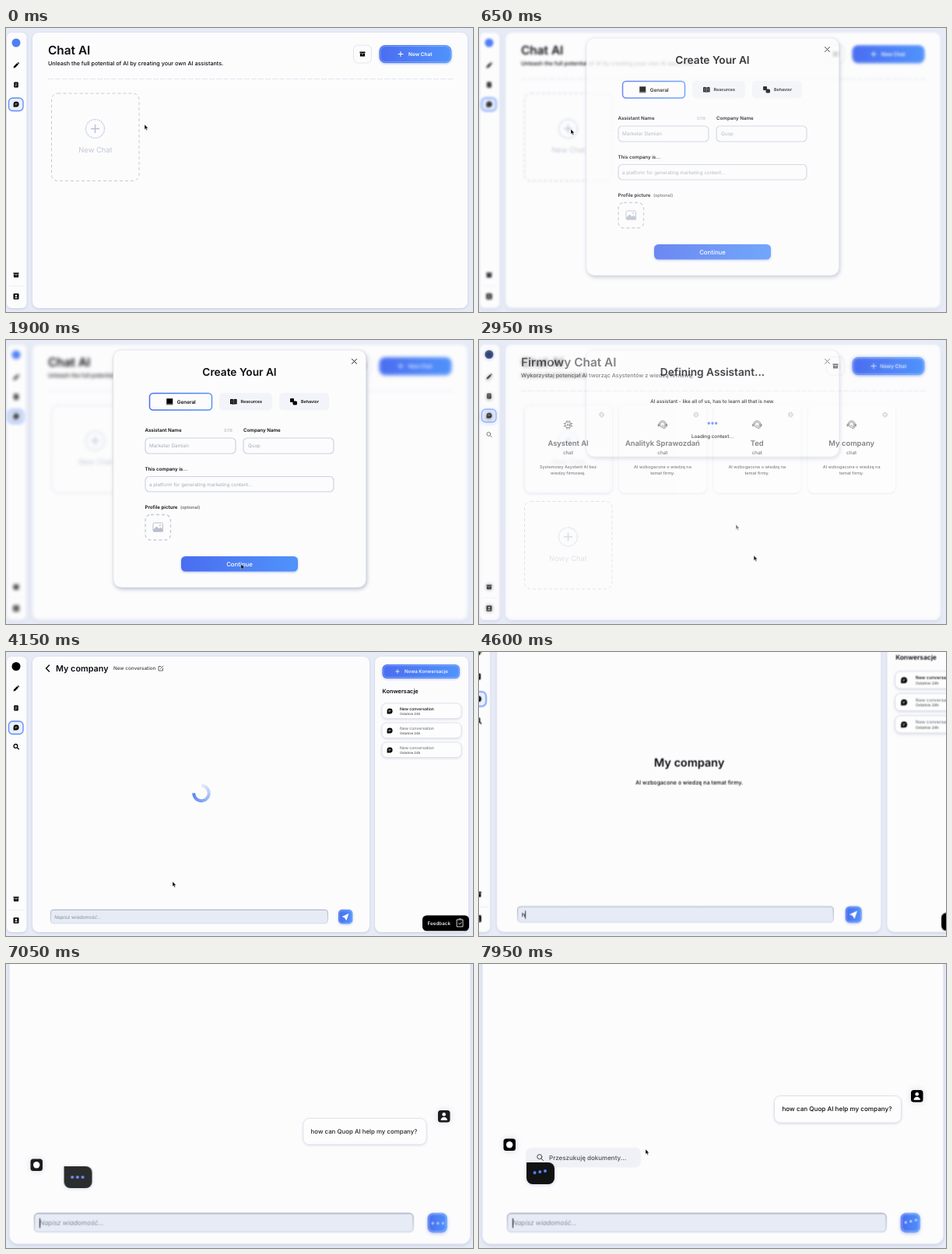
Write an HTML page that moves like this. It is 600x365 px and loops after 8000 ms.

```html
<!DOCTYPE html>
<html lang="en">
<head>
<meta charset="utf-8">
<title>Chat assistant demo</title>
<style>
html, body { margin: 0; width: 100%; height: 100%; overflow: hidden; background: #e7ebf6; }
svg { display: block; width: 600px; height: 365px; font: 500 6.2px Inter, sans-serif; text-rendering: geometricPrecision; }
text { fill: #0b0c10; white-space: pre; }
.mid { text-anchor: middle; }
.bold { font-weight: 600; }
.big { font-weight: 600; font-size: 15.4px; }
.sub { font-size: 7.2px; }
.head { font-weight: 600; font-size: 13.7px; }
.hint { font-weight: 400; fill: #a5abb9; }
.white { fill: #fff; }
.panel { fill: #fcfcfd; filter: drop-shadow(0 1px 1.5px #8f9bbf66); }
.card { fill: #fdfdfe; filter: drop-shadow(0 1px 1.5px #8f9bbf55); }
.dash { fill: none; stroke: #c6cad6; stroke-dasharray: 4 3; }
.line { fill: none; stroke: currentColor; stroke-linecap: round; stroke-linejoin: round; }
.field { fill: #fcfcfd; stroke: #cdd2df; stroke-width: 1.2; }
.blue { fill: url(#blue); filter: drop-shadow(0 1px 1.5px #4a6fd866); }
.rim { fill: none; stroke: #a9c8ff; stroke-opacity: .6; stroke-width: .8; }
.dots { fill: #5b82f5; }

/* one shared 8 s timeline */
.a { animation: 8s linear infinite; }
#home { animation-name: home; }
#modal { animation-name: modal; }
#sheet { animation-name: sheet; }
#form { animation-name: form; }
#wait { animation-name: wait; }
#list { animation-name: list; }
#chat { animation-name: chat; transform-origin: 0 0; }
#spin { animation-name: loading; }
#spin g { animation: turn 1s linear infinite; transform-origin: 251px 181.5px; }
#intro { animation-name: intro; }
#plane { animation-name: plane; }
.sent { animation-name: sent; }
.rise { animation-name: rise; }
#msg { animation-name: grow; transform-origin: 461px 186px; }
#reply { animation-name: reply; }
#chip { animation-name: chip; }
#mouse1 { animation-name: mouse1; animation-timing-function: ease-in-out; }
#mouse2 { animation-name: mouse2; animation-timing-function: ease-in-out; }
#mouse2 use { animation-name: mouse2show; }
#arrow1 { animation-name: arrow; }
#beam { animation-name: beam; }
.dots circle { animation: bounce .8s linear infinite; }
.dots circle:nth-child(2) { animation-delay: .035s; }
.dots circle:nth-child(1) { animation-delay: .07s; }

@keyframes home {
  0%, 5.6% { filter: blur(0); opacity: 1; }
  8.75%, 38.75% { filter: blur(2.2px); opacity: 1; }
  38.8%, 100% { filter: blur(2.2px); opacity: 0; }
}
@keyframes modal { 0%, 5.6% { opacity: 0; } 8.75%, 38.7% { opacity: 1; } 38.8%, 100% { opacity: 0; } }
@keyframes sheet { 0%, 25% { height: 305px; } 26.9%, 100% { height: 137px; } }
@keyframes form { 0%, 5.6% { opacity: 0; } 8.75%, 25% { opacity: 1; } 25.9%, 100% { opacity: 0; } }
@keyframes wait { 0%, 25.6% { opacity: 0; } 26.9%, 36% { opacity: 1; } 39.75%, 100% { opacity: 0; } }
@keyframes list { 0%, 35% { opacity: 0; } 38.75%, 45% { opacity: 1; } 45.1%, 100% { opacity: 0; } }
@keyframes chat {
  0%, 43.75% { opacity: 0; transform: none; }
  45%, 53.75% { opacity: 1; transform: none; animation-timing-function: ease-in-out; }
  62.5%, 100% { opacity: 1; transform: translate(-42px, -132.5px) scale(1.367); }
}
@keyframes loading { 0%, 53% { opacity: 1; } 54%, 100% { opacity: 0; } }
@keyframes turn { from { transform: rotate(-54deg); } to { transform: rotate(306deg); } }
@keyframes intro { 0%, 53.5% { opacity: 0; } 56%, 86.8% { opacity: 1; } 87.4%, 100% { opacity: 0; } }
@keyframes plane { 0%, 86.8% { opacity: 1; } 86.9%, 100% { opacity: 0; } }
@keyframes sent { 0%, 86.8% { opacity: 0; } 88.3%, 100% { opacity: 1; } }
@keyframes rise {
  0%, 96.2% { transform: translateY(var(--d)); animation-timing-function: ease-out; }
  99%, 100% { transform: none; }
}
@keyframes grow { 0%, 86.8% { transform: scale(.94); } 88.1% { transform: scale(.97); } 89.5%, 100% { transform: none; } }
@keyframes reply {
  0%, 86.8% { transform: translate(85px, 260px); }
  88.1% { transform: translate(75px, 260px); animation-timing-function: ease-out; }
  90%, 96.2% { transform: translate(61px, 260px); }
  99%, 100% { transform: translate(61px, 255px); }
}
@keyframes chip { 0%, 96.2% { opacity: 0; transform: translateY(12px); } 99%, 100% { opacity: 1; transform: none; } }
@keyframes bounce { 0%, 100% { transform: translateY(-2px); } 20%, 82% { transform: none; } 94% { transform: translateY(-3px); } }
@keyframes mouse1 {
  0% { transform: translate(178px, 124px); }
  5%, 9% { transform: translate(118px, 130px); }
  12%, 14% { transform: translate(228px, 130px); }
  23%, 26% { transform: translate(302px, 288px); }
  30%, 100% { transform: translate(330px, 237px); }
}
@keyframes mouse2 {
  0%, 36.8% { transform: translate(353px, 277px); }
  42%, 45% { transform: translate(472px, 148px); }
  51.9% { transform: translate(214px, 295px); }
  54.5%, 57% { transform: translate(200px, 337px); }
  57.1%, 100% { transform: translate(214px, 238px); }
}
@keyframes mouse2show {
  0%, 35% { opacity: 0; } 37%, 56% { opacity: 1; }
  56.1%, 97% { opacity: 0; } 97.1%, 100% { opacity: 1; }
}
@keyframes arrow { 0%, 11.8% { opacity: 1; } 11.9%, 15.6% { opacity: 0; } 15.7%, 38.7% { opacity: 1; } 38.8%, 100% { opacity: 0; } }
@keyframes beam { 0%, 11.8% { opacity: 0; } 11.9%, 15.6% { opacity: 1; } 15.7%, 100% { opacity: 0; } }
</style>
</head>
<body>
<svg viewBox="0 0 600 365">
  <defs>
    <linearGradient id="blue"><stop stop-color="#4a6df0"/><stop offset="1" stop-color="#5093fb"/></linearGradient>
    <linearGradient id="inset" x2="0" y2="1"><stop stop-color="#a5adbf"/><stop offset="1" stop-color="#d3d9e6"/></linearGradient>

    <path id="pointer" d="M0 0V6.4L1.5 5.1 2.5 7.4 3.6 6.9 2.6 4.7H4.6Z" fill="#000" stroke="#fff" stroke-width=".4"/>
    <path id="pencil" d="M-3.5 3.5 -3 1.2 1.2-3 3 -1.2 -1.2 3ZM1.8-3.5 2.6-4.2 4.2-2.6 3.5-1.8Z"/>
    <g id="doc"><rect x="-2.8" y="-3.5" width="5.6" height="7" rx="1"/><path d="M-1.4-1.3H1.4M-1.4 .3H1.4M-1.4 1.8H.4" stroke="#fff" stroke-width=".6"/></g>
    <g id="bubble"><path d="M-3.4 3.4V0A3.5 3.4 0 1 1 .2 3.4Z"/><path d="M-1.6-.6H1.7M-1.6 .9H.7" stroke="#fff" stroke-width=".6"/></g>
    <g id="box"><path d="M-3.5-3H3.5V-1.2H-3.5ZM-3.1-.7H3.1V3H-3.1Z"/><path d="M-1 .4H1" stroke="#fff" stroke-width=".7"/></g>
    <g id="person"><rect x="-3.5" y="-3.8" width="7" height="7.6" rx="1"/><g class="white"><circle cy="-1" r="1.3"/><path d="M-2 2.3A2 1.6 0 0 1 2 2.3Z"/></g></g>
    <path id="lens" class="line" d="M1.2 1.2 3.3 3.3M1.8-.6A2.4 2.4 0 1 1-3-.6 2.4 2.4 0 0 1 1.8-.6Z"/>
    <path id="plus" class="line" d="M-3 0H3M0-3V3"/>
    <g id="gear" fill="none" stroke="#8f95a5"><circle r="3.2" stroke-dasharray="1.3 1.2"/><circle r="2"/></g>
    <g id="headset" class="line"><circle r="3.4"/><path d="M-4.6 1.6V-.6A4.6 4.6 0 0 1 4.6-.6V1.6M4.6 1.6Q4.4 4.8 1 4.9M-1.2 .8Q0 2 1.2 .8"/><path d="M-5.4-.4V1.4M5.4-.4V1.4" stroke-width="1.6"/></g>
    <g id="chipset" class="line"><rect x="-3.6" y="-3.6" width="7.2" height="7.2" rx="2"/><path d="M-5.4-1.5H-3.6M-5.4 1.5H-3.6M5.4-1.5H3.6M5.4 1.5H3.6M-1.5-5.4V-3.6M1.5-5.4V-3.6M-1.5 5.4V3.6M1.5 5.4V3.6M-1.5 1.4 -.3-1.4 .8 1.4M2-1.4V1.4"/></g>

    <g id="nav">
      <rect class="panel" x="1" y="6" width="25.5" height="354" rx="6"/>
      <path d="M4 331.5H23" stroke="#eceef4"/>
      <use href="#box" x="13" y="317.5"/><use href="#person" x="13" y="345"/>
    </g>
    <g id="tools">
      <rect x="3.5" y="89" width="18.5" height="16.5" rx="5" fill="#e9effd" stroke="#5f8bf5" stroke-width="1.3"/>
      <use href="#pencil" x="13" y="47"/><use href="#doc" x="13" y="72"/><use href="#bubble" x="13" y="97"/>
    </g>
    <g id="page">
      <use href="#nav"/>
      <rect class="panel" x="34" y="6" width="559" height="354" rx="8"/>
      <path d="M54 65.5H575" stroke="#e2e5ee" stroke-dasharray="7 2"/>
      <rect x="446.5" y="22" width="23" height="23" rx="6" fill="#fcfcfd" stroke="#e2e5ec"/>
      <use href="#box" x="458" y="33.5"/>
      <rect class="blue" x="479.5" y="22" width="93" height="23" rx="8"/>
      <rect class="rim" x="481" y="23.5" width="90" height="20" rx="6.5"/>
      <use href="#plus" x="507" y="33.5" color="#fff"/>
    </g>
    <g id="blank">
      <rect class="dash" x="58.5" y="84" width="112.5" height="112.5" rx="8"/>
      <circle cx="114.5" cy="129.5" r="12" fill="none" stroke="#b7c0d8" stroke-width="1.3" stroke-dasharray="1.5 1.3"/>
      <path d="M109 129.5H120M114.5 124V135" stroke="#b7c0d8" stroke-width="1.4"/>
    </g>
  </defs>

  <g id="home" class="a">
    <use href="#page"/><use href="#tools" y="1"/>
    <circle cx="13" cy="19" r="5.5" fill="#4f7ff3"/>
    <text class="big" x="54" y="34">Chat AI</text>
    <text class="sub" x="54" y="48">Unleash the full potential of AI by creating your own AI assistants.</text>
    <text class="white bold" x="517" y="36" font-size="6.5">New Chat</text>
    <use href="#blank"/>
    <text class="mid" x="115" y="160" style="fill:#c3c8d5;font-size:9.4px;font-weight:400">New Chat</text>
  </g>

  <g id="modal" class="a">
    <rect id="sheet" class="panel a" x="138" y="13" width="324.5" height="305" rx="10" stroke="#dfe2ea" stroke-width=".6" style="filter:drop-shadow(1px 2px 2.5px #7d88a888)"/>
    <path class="line" d="M444.5 24.5l6 6m0-6l-6 6" color="#222"/>
  </g>

  <g id="form" class="a">
    <text class="head mid" x="300" y="46">Create Your AI</text>
    <rect x="184.5" y="68.5" width="80" height="21.5" rx="4.5" fill="#fcfcfd" stroke="url(#blue)" stroke-width="1.5"/>
    <rect x="274" y="68" width="68" height="22.5" rx="5" fill="#f3f4f9"/>
    <rect x="351" y="68" width="64" height="22.5" rx="5" fill="#f3f4f9"/>
    <path d="M206 75H214.5V83.5H206ZM206.5 82.3H214" stroke="#fff" stroke-width=".5"/>
    <path d="M288 76.2Q290.5 75.4 292.3 76.4 294-75.4 292.3 76.4 294.5 75.4 296.6 76.2V82.4Q294 82 292.3 82.9 290.5 82 288 82.4Z"/>
    <path d="M292.3 76.5V82.8M289.2 78H291M293.6 78H295.4M289.2 80H291M293.6 80H295.4" stroke="#fff" stroke-width=".5"/>
    <rect x="365" y="75" width="5" height="5" rx="1"/><rect x="368.5" y="78.5" width="5.5" height="5" rx="1.6"/>
    <g class="bold"><text x="219.7" y="81.6" font-size="6.4">General</text><text x="301.5" y="81.3" font-size="5.4">Resources</text><text x="379" y="81.3" font-size="5.4">Behavior</text>
      <text x="178.5" y="118">Assistant Name</text><text x="305" y="118">Company Name</text>
      <text x="178.5" y="167.5">This company is...</text><text x="178.5" y="216.7">Profile picture</text></g>
    <text class="hint" x="280" y="118" font-size="5.4">0/18</text>
    <text x="224" y="216.7" font-size="5.5" style="fill:#555">(optional)</text>
    <rect class="field" x="179" y="126" width="116" height="20" rx="5"/><rect class="field" x="305" y="126" width="116" height="20" rx="5"/>
    <rect class="field" x="179" y="175.5" width="242" height="19.5" rx="5"/>
    <text class="hint" x="184" y="138.4" font-size="6.3">Marketer Damian</text>
    <text class="hint" x="311" y="138.4">Quop</text>
    <text class="hint" x="184" y="187.7">a platform for generating marketing content...</text>
    <rect class="dash" x="179" y="224.5" width="32.5" height="32.5" rx="7" style="stroke-width:1.3"/>
    <g fill="none" stroke="#b9bfcc"><rect x="189" y="235" width="12.5" height="11" rx="1.5"/><path d="M189.5 244l4-4 3 3 2-2 3 3V246H189.5Z" fill="#b9bfcc"/><circle cx="198" cy="238" r=".6"/></g>
    <rect class="blue" x="225" y="278" width="150" height="19.5" rx="5.5"/>
    <text class="white mid" x="300" y="290.5" font-size="7.8">Continue</text>
  </g>

  <g id="mouse1" class="a">
    <use id="arrow1" class="a" href="#pointer"/>
    <path id="beam" class="line a" d="M-1.2-3.5Q0-3.5 0-2.6V2.6Q0 3.5-1.2 3.5M1.2-3.5Q0-3.5 0-2.6M0 2.6Q0 3.5 1.2 3.5" stroke-width=".8"/>
  </g>

  <g id="list" class="a">
    <use href="#page"/><use href="#tools"/><use href="#lens" x="13" y="121.5"/>
    <circle cx="13" cy="18.5" r="5.5"/>
    <text class="big" x="54" y="34">Firmowy Chat AI</text>
    <text class="sub" x="54" y="48">Wykorzystaj potencjał AI tworząc Asystentów z wiedzą firmową.</text>
    <text class="white bold" x="515" y="36" font-size="6.5">Nowy Chat</text>
    <g id="cards"></g>
    <use href="#blank" y="123.5"/>
    <text class="mid" x="114.5" y="283.5" style="fill:#c3c8d5;font-size:9.4px;font-weight:400">Nowy Chat</text>
  </g>

  <g id="wait" class="a">
    <text class="head mid" x="300" y="46">Defining Assistant...</text>
    <text class="mid" x="300" y="81" font-size="6.3">AI assistant - like all of us, has to learn all that is new.</text>
    <g class="dots"><circle cx="295.3" cy="107" r="1.7"/><circle cx="300" cy="107" r="1.7"/><circle cx="304.7" cy="107" r="1.7"/></g>
    <text class="mid" x="300" y="126" font-size="6.3">Loading context...</text>
  </g>

  <g id="chat" class="a">
    <use href="#nav"/><use href="#tools"/><use href="#lens" x="13" y="121.5" stroke-width="1.3"/>
    <circle cx="13" cy="18.5" r="5.5"/>
    <rect class="panel" x="34" y="6" width="433" height="354" rx="8"/>
    <rect class="panel" x="474" y="6" width="120" height="354" rx="8"/>
    <path class="line" d="M55.5 17l-4 4 4 4" stroke-width="1.4"/>
    <text class="bold" x="64" y="25" font-size="10.8">My company</text>
    <text x="138" y="23.2" font-size="6.3" style="fill:#444">New conversation</text>
    <path class="line" d="M199 18.5H196V24H201.5V21M198.5 21.5 202 18" stroke-width=".8" color="#444"/>
    <rect class="blue" x="483.5" y="16" width="99.5" height="18" rx="6"/><rect class="rim" x="485" y="17.5" width="96.5" height="15" rx="5"/>
    <use href="#plus" x="503" y="25" color="#fff" transform="translate(125.7 6.2) scale(.75)"/>
    <text class="white" x="512" y="27.3" font-size="6.1">Nowa Konwersacje</text>
    <text class="bold" x="483.5" y="52.7" font-size="7.4">Konwersacje</text>
    <g id="threads"></g>
    <g id="spin" class="a"><g></g></g>
    <g id="intro" class="a">
      <text class="bold mid" x="251" y="173" font-size="12.7">My company</text>
      <text class="mid" x="251" y="193.6" font-size="6.25">AI wzbogacone o wiedzę na temat firmy.</text>
    </g>
    <rect x="57.4" y="331.4" width="356" height="17.4" rx="3.5" fill="#e6ebf6" stroke="url(#inset)"/>
    <text id="ghost" class="hint" x="62.2" y="342.6" font-size="6.1" font-style="italic" style="fill:#858c9b">Napisz wiadomość...</text>
    <text id="typed" x="62.2" y="342.6" font-size="6.25"></text>
    <rect id="caret" y="336" width=".7" height="9"/>
    <rect class="blue" x="427" y="331" width="18.3" height="18.3" rx="5"/><rect class="rim" x="428.2" y="332.2" width="15.9" height="15.9" rx="4"/>
    <path id="plane" class="white a" d="M431.5 340.2l9-4.2-3.2 9.2-2.3-3.7z"/>
    <g class="sent a"><g class="dots" style="fill:#a9cbff"><circle cx="431.8" cy="340.6" r="1.3"/><circle cx="436.6" cy="340.6" r="1.3"/><circle cx="441.4" cy="340.6" r="1.3"/></g></g>
    <rect x="535" y="338.5" width="60" height="20" rx="5.5"/>
    <text class="white" x="541.5" y="350.8" font-size="6.3">Feedback</text>
    <path class="line" d="M579.5 344H587V353H579.5ZM581.8 343H584.8M581.5 348.8l1.3 1.3 2.3-2.6" color="#fff" stroke-width=".8"/>
  </g>

  <g class="sent a">
    <g class="rise a" style="--d:28.5px"><g id="msg" class="a">
      <rect class="card" x="379.5" y="169.5" width="163" height="34.5" rx="8" stroke="#dadde6" stroke-width=".8"/>
      <text id="said" x="389.5" y="189.4" font-size="8.1"></text>
    </g></g>
    <g class="rise a" style="--d:26px">
      <g style="filter:drop-shadow(0 0 4px #9aa3bb66)"><rect x="555" y="162" width="15.5" height="15.5" rx="3.5"/><rect x="31.5" y="224.5" width="15.5" height="15.5" rx="3.5"/></g>
      <g class="white"><circle cx="562.7" cy="167.3" r="2.3"/><path d="M558.5 174.8A4.2 4 0 0 1 567 174.8Z"/><circle cx="39.2" cy="232.2" r="4.2"/></g>
    </g>
    <g id="chip" class="a">
      <rect x="61" y="237" width="146" height="23.5" rx="6" fill="#f0f1f6" style="filter:drop-shadow(0 0 1px #9aa3bb44)"/>
      <use href="#lens" color="#444" transform="translate(78.5 248.5) scale(1.25)" stroke-width=".8"/>
      <text x="90" y="251.8" font-size="8" style="fill:#4d4f57">Przeszukuję dokumenty...</text>
    </g>
    <g id="reply" class="a">
      <path d="M0 0H28a8 8 0 0 1 8 8v12a8 8 0 0 1-8 8H8a8 8 0 0 1-8-8Z" fill="#111214" style="filter:drop-shadow(0 1px 2px #8f9bbf66)"/>
      <g class="dots"><circle cx="10.6" cy="14" r="2"/><circle cx="17.3" cy="14" r="2"/><circle cx="24" cy="14" r="2"/></g>
    </g>
  </g>

  <g id="mouse2" class="a"><use class="a" href="#pointer"/></g>
</svg>
<script>
const $ = id => document.getElementById(id);
const QUESTION = 'how can Quop AI help my company?';
const SENT = 6950;

// static repeats
const about = ['AI wzbogacone o wiedzę na', 'temat firmy.'];
$('cards').innerHTML = [
  ['Asystent AI', 'chipset', ['Systemowy Asystent AI bez', 'wiedzy firmowej.']],
  ['Analityk Sprawozdań', 'headset', about],
  ['Ted', 'headset', about],
  ['My company', 'headset', about]
].map(([name, icon, [top, low]], i) => `<g transform="translate(${58.5 + i * 121.4} 84)">
  <rect class="card" width="112.5" height="112.5" rx="8"/>
  <use href="#gear" x="99" y="12"/><use href="#${icon}" x="56" y="25" color="#333"/>
  <g class="mid"><text class="bold" x="56" y="52.3" font-size="9.4">${name}</text>
  <text x="56" y="63" font-size="6.3">chat</text>
  <g font-size="5.5"><text x="56" y="81">${top}</text><text x="56" y="89">${low}</text></g></g></g>`).join('');

$('threads').innerHTML = [0, 1, 2].map(i => `<g transform="translate(483 ${66 + i * 25})">
  <rect class="card" width="102" height="19.5" rx="6" stroke="#dcdfe8" stroke-width=".8"/>
  <use href="#bubble" x="10" y="10"/>
  <text x="23" y="9" font-size="5.1" style="fill:${i ? '#777c88' : '#0b0c10'}">New conversation</text>
  <text x="23" y="14.8" font-size="4.3" style="fill:#555">Ostatnie 24h</text></g>`).join('');

const onRing = deg => {
  const a = deg * Math.PI / 180;
  return `${251 + 9.7 * Math.cos(a)} ${181.5 + 9.7 * Math.sin(a)}`;
};
$('spin').firstChild.innerHTML = Array.from({ length: 27 }, (_, i) => {
  const deg = i * 10 - 90;
  return `<path d="M${onRing(deg)}A9.7 9.7 0 0 1 ${onRing(deg + 10.5)}" fill="none" stroke="#4a7bee" stroke-width="4" opacity="${.12 + .88 * i / 26}"/>`;
}).join('');

$('said').textContent = QUESTION;

// typing: [time, characters]
const KEYS = [[4500, 0], [5100, 12], [5450, 17], [6500, QUESTION.length]];
function typedCount(t) {
  if (t <= KEYS[0][0] || t >= SENT) return 0;
  const i = KEYS.findIndex(k => t <= k[0]);
  if (i < 0) return QUESTION.length;
  const [t0, n0] = KEYS[i - 1], [t1, n1] = KEYS[i];
  return Math.floor(n0 + (n1 - n0) * (t - t0) / (t1 - t0) + 1e-6);
}

const clock = $('chat').getAnimations()[0];
function draw() {
  const t = (clock ? clock.currentTime || 0 : performance.now()) % 8000;
  const n = typedCount(t);
  const typed = $('typed');
  typed.textContent = QUESTION.slice(0, n);
  $('ghost').style.opacity = n ? 0 : 1;
  $('caret').setAttribute('x', 62.2 + (n ? typed.getComputedTextLength() : 0));
  $('caret').style.opacity = t < 4400 || (t >= 6750 && t < SENT) ? 0 : 1;
  requestAnimationFrame(draw);
}
draw();
</script>
</body>
</html>
```
